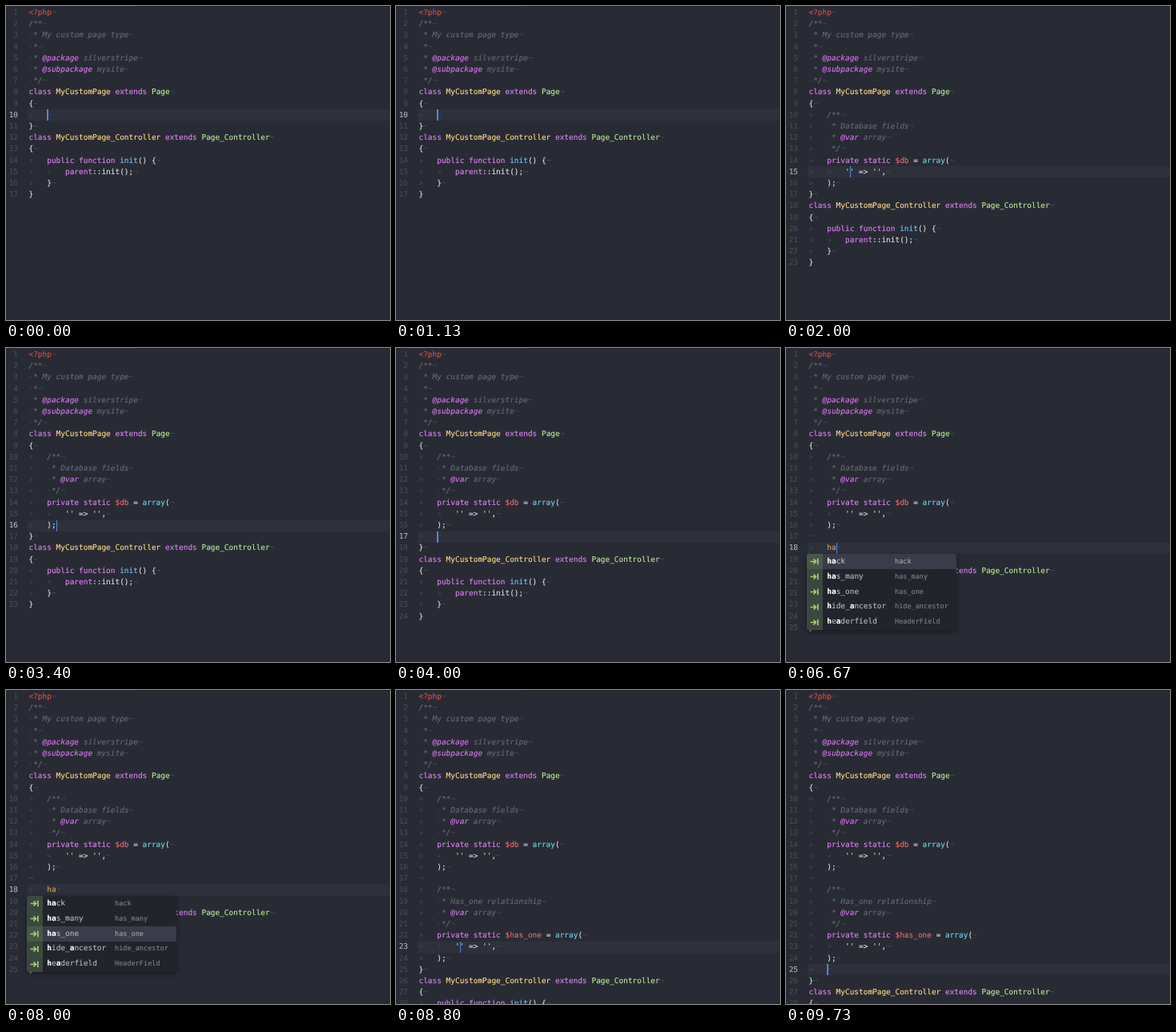
These frames come from a looping animation (480x392 px, 9.79 s). An HTML page:

```html
<!DOCTYPE html>
<html lang="en">
<head>
<meta charset="utf-8">
<title>Snippet completion</title>
<style>
  html, body { margin: 0; width: 100%; height: 100%; overflow: hidden; background: #292b34; }
  #stage {
    position: relative; width: 480px; height: 392px; overflow: hidden;
    background: #292b34; color: #dcdfe6;
    font: 9.45px/14.2px "DejaVu Sans Mono", monospace;
    text-rendering: geometricPrecision; white-space: pre;
    -webkit-text-stroke: 0.12px;
  }
  #stage::before {
    content: ""; position: absolute; left: 162px; right: 0; top: 0; height: 1px; background: #1d2026;
  }
  .row { position: absolute; left: 0; width: 480px; height: 14.2px; }
  .row.on { background: linear-gradient(90deg, transparent 27px, #2e313c 27px); }
  .num, .code { position: absolute; top: 0.6px; }
  .num { right: 465px; color: #484b56; }
  .on .num { color: #b0b4bd; }
  .code { left: 28.5px; }
  .inv { color: #41444f; font-style: normal; }
  .com { color: #656a75; font-style: italic; }
  .tag { color: #d678f0; font-style: italic; }
  .kw { color: #dc83f3; }
  .red { color: #d2514e; }
  .var { color: #ec6a72; }
  .str { color: #b4e58a; }
  .cls { color: #ffdc88; }
  .base { color: #bcec9a; }
  .sup { color: #6fd4e6; }
  .fn { color: #70c4fc; }
  .word { color: #d69d68; }
  #caret { position: absolute; width: 1.4px; height: 14.2px; background: #4f86e4; }
  #menu {
    position: absolute; left: 26px; top: 257px; width: 187px; height: 94.5px; overflow: hidden;
    border-radius: 2px; background: #21242b;
  }
  #shade {
    position: absolute; left: 26px; top: 257px; width: 187px; height: 94.5px;
    border-radius: 2px; box-shadow: 0 2px 6px rgba(0, 0, 0, .4);
  }
  .item { position: relative; height: 18.9px; line-height: 18.9px; color: #b3b8c2; }
  .item.sel { background: #3a3d49; }
  .item b { color: #fff; }
  .item svg { position: absolute; left: 0; top: 0; background: #3c483f; }
  .item.sel svg { background: #49574b; }
  .name, .hint { position: absolute; top: 0.8px; }
  .name { left: 25.3px; }
  .hint { left: 110px; font-size: 8.56px; color: #7c818b; }
  .sel .hint { color: #a0a5ae; }
</style>
</head>
<body>
<div id="stage"><div id="text"></div><div id="caret"></div><div id="shade"></div><div id="menu"></div></div>
<script>
const LOOP = 9790, CHAR = 5.69, LINE = 14.2, LEFT = 28.5, TOP = 1.5;
const $ = id => document.getElementById(id);

const head = ['<?php', '/**', ' * My custom page type', ' *', ' * @package silverstripe',
  ' * @subpackage mysite', ' */', 'class MyCustomPage extends Page', '{'];
const tail = ['}', 'class MyCustomPage_Controller extends Page_Controller', '{',
  '\tpublic function init() {', '\t\tparent::init();', '\t}', '}'];
const block = (title, name) => ['/**', ` * ${title}`, ' * @var array', ' */',
  `private static $${name} = array(`, "\t'' => '',", ');'].map(s => '\t' + s);

const db = block('Database fields', 'db');
const both = [...db, '', ...block('Has_one relationship', 'has_one')];
const typed = s => [...db, '', '\t' + s];

// time, class body, caret row, caret column, selected menu item
const steps = [
  [0, ['\t'], 9, 4],
  [1200, ['\td'], 9, 5],
  [1330, ['\tdb'], 9, 6],
  [1670, db, 14, 9],
  [3270, db, 15, 6],
  [3600, [...db, '\t'], 16, 4],
  [4170, typed(''), 17, 4],
  [6370, typed('h'), 17, 5],
  [6500, typed('ha'), 17, 6, 0],
  [7670, typed('ha'), 17, 6, 1],
  [7870, typed('ha'), 17, 6, 2],
  [8330, both, 22, 9],
  [8870, both, 23, 6],
  [9330, [...both, '\t'], 24, 4]
];

const rules = [
  ['red', '<\\?php'], ['var', '\\$\\w+'], ['str', "''"],
  ['kw', '\\b(?:class|extends|private|static|public|function|parent)\\b'],
  ['cls', 'MyCustom\\w+'], ['base', 'Page\\w*'], ['sup', 'array'],
  ['fn', 'init(?=\\(\\) )'], ['word', '^(?:ha?|db?)$']
];
const syntax = new RegExp(rules.map(r => `(${r[1]})`).join('|'), 'g');

function add(parent, cls, text = '', tag = 'span') {
  const el = document.createElement(tag);
  el.className = cls;
  el.textContent = text;
  parent.append(el);
  return el;
}

function paintCode(box, line, last) {
  const indent = line.match(/^\s*/)[0], code = line.slice(indent.length);
  add(box, 'inv', indent.replace(/ /g, '·').replace(/\t/g, '»   '));
  if (/^(\/\*|\*)/.test(code)) {
    for (const part of code.split(/(@\w+)/)) add(box, part[0] === '@' ? 'tag' : 'com', part);
  } else {
    let pos = 0;
    for (const m of code.matchAll(syntax)) {
      box.append(code.slice(pos, m.index));
      add(box, rules[m.slice(1).findIndex(Boolean)][0], m[0]);
      pos = m.index + m[0].length;
    }
    box.append(code.slice(pos));
  }
  if (!last) add(box, 'inv', '¬');
}

function paintText(body, active) {
  const text = $('text'), lines = [...head, ...body, ...tail];
  text.replaceChildren();
  lines.forEach((line, i) => {
    const row = add(text, i === active ? 'row on' : 'row', '', 'div');
    row.style.top = TOP + i * LINE + 'px';
    add(row, 'num', i + 1);
    paintCode(add(row, 'code'), line, i === lines.length - 1);
  });
}

const icon = '<svg width="20" height="19" fill="none" stroke="#9fce78" stroke-width="1.7">' +
  '<path d="M4.5 9.5H11M8.5 6.5L11.5 9.5L8.5 12.5M13.8 5.8V13.2"/></svg>';
for (const hint of ['hack', 'has_many', 'has_one', 'hide_ancestor', 'HeaderField']) {
  const item = add($('menu'), 'item', '', 'div'), word = hint.toLowerCase(), a = word.indexOf('a');
  item.innerHTML = icon;
  const name = add(item, 'name');
  [...word].forEach((c, i) => add(name, '', c, i === 0 || i === a ? 'b' : 'span'));
  add(item, 'hint', hint);
}

// Solid after a key press, then blinking; moving through the menu does not reset it.
function caretOn(t, n) {
  while (steps[n][4] > 0) n--;
  const age = t - steps[n][0] - 700;
  return age < 0 || Math.floor(age / 400) % 2 === 1;
}

let shown = -1;
function draw(t) {
  let n = steps.length - 1;
  while (steps[n][0] > t) n--;
  if (n !== shown) {
    const [, body, row, col, pick] = steps[n];
    shown = n;
    paintText(body, row);
    $('caret').style.left = LEFT + col * CHAR + 'px';
    $('caret').style.top = TOP + row * LINE + 'px';
    $('menu').hidden = $('shade').hidden = pick === undefined;
    [...$('menu').children].forEach((el, i) => el.classList.toggle('sel', i === pick));
  }
  $('caret').hidden = !caretOn(t, n);
}

const start = performance.now();
function tick() {
  draw((performance.now() - start) % LOOP);
  requestAnimationFrame(tick);
}
tick();
</script>
</body>
</html>
```
